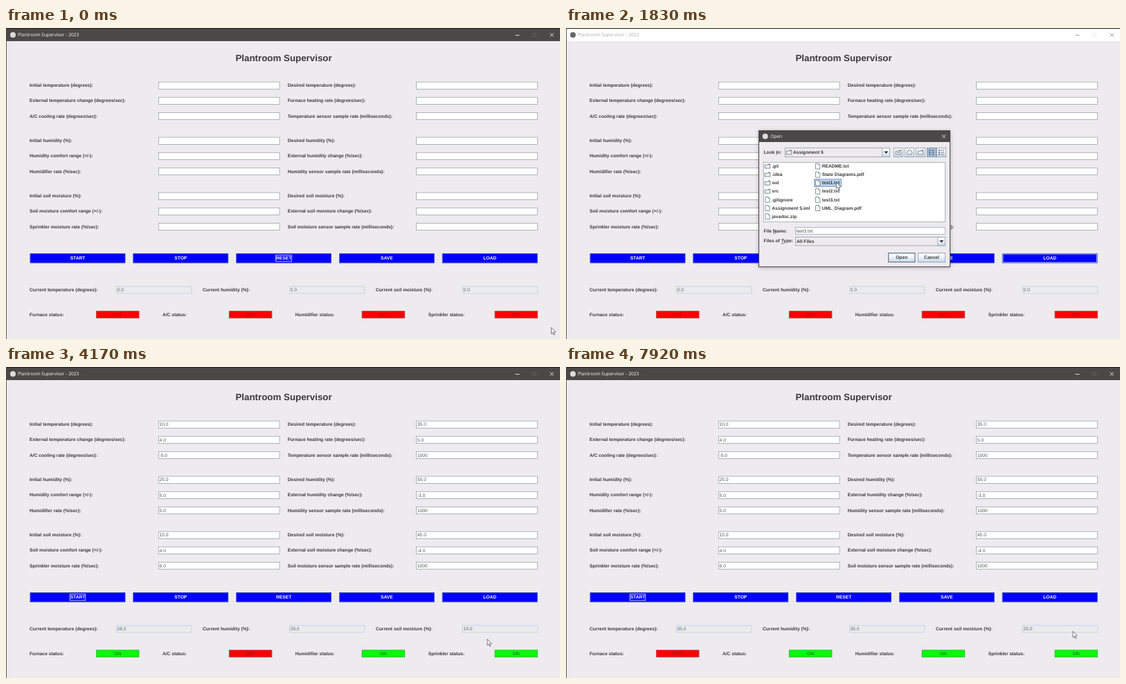
These frames come from a looping animation (800x450 px, 8000 ms). An HTML page with a canvas:

```html
<!DOCTYPE html>
<html lang="en">
<head>
<meta charset="utf-8">
<title>Plantroom Supervisor</title>
<style>
html, body { margin: 0; width: 100%; height: 100%; overflow: hidden; background: #edebed; }
canvas { display: block; width: 100vw; height: 100vh; }
</style>
</head>
<body>
<canvas id="stage" width="800" height="450"></canvas>
<script>
const ctx = document.getElementById('stage').getContext('2d');
const LOOP = 8000, STEP = 1000 / 12;
const APP = 'Plantroom Supervisor';
const SANS = '"Liberation Sans", Arial, sans-serif';
const BOLD = 'bold 6.67px ' + SANS, PLAIN = '6.67px ' + SANS;
const BAR = '6.67px "Open Sans", sans-serif';
const BG = '#edebed', INK = '#3a3a3a', EDGE = '#7a8490', SKY = '#b8cfe5';
const HAIR = 0.6;

// Moments of the interaction, in ms
const PRESS_LOAD = 830, BLUR = 910, OPEN = 1080, PICK = 1745, CLOSE = 2080,
  PRESS_START = 2825, RELEASE_START = 2910, FIRST_SAMPLE = 2995;

// Cursor tip: time, x, y
const PATH = [
  [0, 787, 433], [150, 784, 426], [580, 702, 338], [700, 694, 331], [880, 690, 330],
  [1000, 616, 318], [1250, 470, 262], [1580, 392, 224], [1700, 390, 223], [1990, 390, 223],
  [2200, 322, 276], [2417, 226, 323], [2500, 160, 328], [2667, 108, 329], [2920, 108, 329],
  [3170, 190, 338], [3417, 333, 350], [3667, 480, 372], [4000, 648, 400], [4200, 704, 392],
  [4417, 718, 384], [7500, 718, 384], [7830, 731, 382], [8000, 732, 382]
];

const ROWS = [
  ['Initial temperature (degrees):', '10.0', 'Desired temperature (degrees):', '35.0'],
  ['External temperature change (degrees/sec):', '4.0', 'Furnace heating rate (degrees/sec):', '5.0'],
  ['A/C cooling rate (degrees/sec):', '-5.0', 'Temperature sensor sample rate (milliseconds):', '1000'],
  ['Initial humidity (%):', '25.0', 'Desired humidity (%):', '55.0'],
  ['Humidity comfort range (+/-):', '5.0', 'External humidity change (%/sec):', '-3.0'],
  ['Humidifier rate (%/sec):', '5.0', 'Humidity sensor sample rate (milliseconds):', '1000'],
  ['Initial soil moisture (%):', '15.0', 'Desired soil moisture (%):', '45.0'],
  ['Soil moisture comfort range (+/-):', '4.0', 'External soil moisture change (%/sec):', '-4.0'],
  ['Sprinkler moisture rate (%/sec):', '6.0', 'Soil moisture sensor sample rate (milliseconds):', '1000']
];
const BUTTONS = ['START', 'STOP', 'RESET', 'SAVE', 'LOAD'];
const FOLDERS = ['.git', '.idea', 'out', 'src'];
const FILES = [
  [...FOLDERS, '.gitignore', 'Assignment 5.iml', 'javadoc.zip'],
  ['README.txt', 'State Diagrams.pdf', 'test1.txt', 'test2.txt', 'test3.txt', 'UML_Diagram.pdf']
];

function text(s, x, y, font = BOLD, color = INK, align = 'left') {
  ctx.font = font;
  ctx.fillStyle = color;
  ctx.textAlign = align;
  ctx.fillText(s, x, y);
}

function box(x, y, w, h, fill, edge, lw = HAIR) {
  if (fill) { ctx.fillStyle = fill; ctx.fillRect(x, y, w, h); }
  if (edge) {
    ctx.strokeStyle = edge;
    ctx.lineWidth = lw;
    ctx.strokeRect(x + lw / 2, y + lw / 2, w - lw, h - lw);
  }
}

function trace(pts) {
  ctx.beginPath();
  pts.forEach(([x, y], i) => i ? ctx.lineTo(x, y) : ctx.moveTo(x, y));
}

function line(color, lw, ...pts) {
  trace(pts);
  ctx.strokeStyle = color;
  ctx.lineWidth = lw;
  ctx.stroke();
}

function shape(fill, edge, lw, pts) {
  trace(pts);
  ctx.closePath();
  ctx.fillStyle = fill;
  ctx.fill();
  if (edge) { ctx.strokeStyle = edge; ctx.lineWidth = lw; ctx.stroke(); }
}

function dot(x, y, r, color) {
  ctx.fillStyle = color;
  ctx.beginPath();
  ctx.arc(x, y, r, 0, Math.PI * 2);
  ctx.fill();
}

function cross(x, y, color) {
  line(color, 0.9, [x - 2.6, y - 2.6], [x + 2.6, y + 2.6]);
  line(color, 0.9, [x - 2.6, y + 2.6], [x + 2.6, y - 2.6]);
}

// Label with one underlined letter
function mnemonic(s, at, x, y) {
  text(s, x, y);
  const a = x + ctx.measureText(s.slice(0, at)).width;
  line(INK, 0.6, [a, y + 3.2], [a + ctx.measureText(s[at]).width, y + 3.2]);
}

function shade(y, h) {
  const g = ctx.createLinearGradient(0, y, 0, y + h);
  g.addColorStop(0, '#e4ecf4');
  g.addColorStop(0.3, '#fafbfd');
  g.addColorStop(1, '#c4d6e8');
  return g;
}

function titleBar(active) {
  const ink = active ? '#fff' : '#aaa';
  box(0, 0, 800, 19, active ? '#4b4848' : '#fff');
  box(0, 0, 800, 1, '#1b1a1b');
  dot(10, 10, 4, active ? '#dcdcdc' : '#666');
  text(APP + ' - 2023', 17, 10.2, BAR, ink);
  line(active ? '#eee' : '#999', 0.9, [735.5, 10.5], [741.5, 10.5]);
  box(760.5, 7.5, 5, 5, null, active ? '#6c6969' : '#e2e2e2', 0.8);
  cross(788.3, 10, active ? '#eee' : '#888');
}

function button(label, i, focused, pressed, hover) {
  const x = 34.7 + i * 148.8, w = 137.6, y = 326;
  box(x, y, w, 14.2, pressed ? '#adc4db' : '#00f', EDGE);
  if (hover) box(x + HAIR, y + HAIR, w - 2 * HAIR, 13, null, SKY, 0.9);
  text(label, x + w / 2, y + 7.4, BOLD, pressed ? '#d9e4ef' : '#fff', 'center');
  if (focused) {
    const tw = ctx.measureText(label).width;
    box(x + w / 2 - tw / 2 - 0.8, y + 2.1, tw + 1.6, 10.1, null, '#dfe8fa', 0.8);
  }
}

function form(loaded) {
  ROWS.forEach((row, i) => {
    const y = 83.2 + Math.floor(i / 3) * 80 + (i % 3) * 22.1;
    [[34, 220], [406.7, 592.3]].forEach(([lx, fx], c) => {
      text(row[c * 2], lx, y + 0.3);
      box(fx, y - 5.4, 175.3, 10.8, '#fff', EDGE);
      if (loaded) text(row[c * 2 + 1], fx + 1.6, y + 0.4, PLAIN, '#555');
    });
  });
}

// Readings and switches after n samples
function greenhouse(n) {
  if (!n) return { values: [0, 0, 0], on: [0, 0, 0, 0] };
  const temp = [19, 28, 32, 36, 35][n - 1];
  return {
    values: [temp, 25 + 2 * n, 15 + 2 * n],
    on: [n < 3, n > 4, true, true]
  };
}

function readings(n) {
  const { values, on } = greenhouse(n);
  ['temperature (degrees)', 'humidity (%)', 'soil moisture (%)'].forEach((s, i) => {
    const x = 34 + i * 250;
    text('Current ' + s + ':', x, 379.3);
    box(x + 125, 373.6, 109.3, 10.8, '#ebebed', SKY, 0.8);
    text(values[i].toFixed(1), x + 126.6, 379.4, PLAIN, '#666');
  });
  ['Furnace', 'A/C', 'Humidifier', 'Sprinkler'].forEach((s, i) => {
    const x = 34 + i * 191.9;
    text(s + ' status:', x, 415.1);
    box(x + 96, 409.4, 62.3, 10.7, on[i] ? '#0f0' : '#f00', EDGE);
    text(on[i] ? 'ON' : 'OFF', x + 127.2, 415.2, PLAIN,
      on[i] ? 'rgba(35,50,35,.8)' : 'rgba(60,40,40,.6)', 'center');
  });
}

function folder(x, y) {
  shape('#e9eef4', '#5d656e', 0.7,
    [[x - 3.8, y - 2], [x, y - 2], [x + 1, y - 3], [x + 3.8, y - 3], [x + 3.8, y + 3], [x - 3.8, y + 3]]);
  line('#5d656e', 0.9, [x + 0.8, y - 2.4], [x + 3.6, y - 2.4]);
}

function sheet(x, y) {
  shape('#fff', '#59636e', 0.7,
    [[x - 3, y - 4], [x + 1, y - 4], [x + 3.2, y - 1.8], [x + 3.2, y + 4], [x - 3, y + 4]]);
  line('#59636e', 0.5, [x + 1, y - 4], [x + 1, y - 1.8], [x + 3.2, y - 1.8]);
}

function combo(x, y, w, h) {
  const arrow = 11.5, cx = x + w - arrow / 2, cy = y + h / 2;
  box(x, y, w, h, BG, EDGE);
  box(x + w - arrow, y, arrow, h, shade(y, h), EDGE);
  shape('#222', null, 0, [[cx - 3, cy - 1.4], [cx + 3, cy - 1.4], [cx, cy + 1.8]]);
}

function toolbar() {
  [473, 489, 505, 521, 535].forEach((x, i) => {
    const chosen = i === 3, cx = x + 7, cy = 180;
    box(x, 173, 14, 14, chosen ? '#a3bdd7' : shade(173, 14), EDGE);
    if (i < 3) {
      if (i === 1) shape('#e9eef4', '#5d656e', 0.7, [[cx - 4, cy], [cx - 2, cy - 3], [cx + 2, cy - 3], [cx + 4, cy], [cx + 3, cy + 3], [cx - 3, cy + 3]]);
      else folder(cx, cy);
      if (i === 0) line('#333', 0.7, [cx - 1.5, cy + 1], [cx, cy - 0.8], [cx + 1.5, cy + 1]);
    } else {
      for (let r = -1; r < 2; r++) {
        const y = cy + r * 3;
        box(cx - 4, y - 0.9, 1.8, 1.8, '#4d617c');
        line('#555', 0.7, [cx - 1.2, y], [cx + (chosen ? 0.2 : 4), y]);
        if (chosen) box(cx + 1.4, y - 0.9, 1.8, 1.8, '#4d617c');
      }
    }
  });
}

function dialog(picked) {
  ctx.save();
  ctx.shadowColor = 'rgba(0,0,0,.3)';
  ctx.shadowBlur = 5;
  ctx.shadowOffsetY = 1;
  box(278, 148, 277, 198, BG);
  ctx.restore();
  box(278, 148, 277, 198, null, '#4b4848', 1);
  box(278, 148, 277, 17, '#4b4848');
  dot(287.7, 156.8, 4, '#dcdcdc');
  text('Open', 295, 157, BAR, '#fff');
  cross(545.7, 156.8, '#eee');

  mnemonic('Look In:', 5, 285.5, 180);
  combo(316, 173, 152, 14);
  folder(322, 180);
  text('Assignment 5', 328, 180);
  toolbar();

  box(285, 194, 263, 87, '#fff', EDGE);
  FILES.forEach((names, c) => names.forEach((name, r) => {
    const x = 291 + c * 72.5, y = 200 + r * 12.1;
    if (picked && name === 'test1.txt') box(x - 5.4, y - 5.7, 40, 11.4, SKY, '#6382bf');
    (FOLDERS.includes(name) ? folder : sheet)(x, y);
    text(name, x + 6.2, y + 0.3);
  }));

  mnemonic('File Name:', 5, 285.5, 293.8);
  box(331, 288, 217, 11, '#fff', EDGE);
  if (picked) text('test1.txt', 332.8, 293.8, PLAIN, '#444');
  mnemonic('Files of Type:', 9, 285.5, 308.6);
  combo(331, 302, 217, 13.2);
  text('All Files', 333, 308.8);

  box(465, 325, 39.5, 14.2, shade(325, 14), '#66788a', 1.2);
  text('Open', 484.7, 332.3, BOLD, INK, 'center');
  box(508, 325, 40, 14.2, shade(325, 14), EDGE);
  text('Cancel', 528, 332.3, BOLD, INK, 'center');
}

function cursor(t) {
  let i = 1;
  while (i < PATH.length - 1 && PATH[i][0] < t) i++;
  const [t0, x0, y0] = PATH[i - 1], [t1, x1, y1] = PATH[i];
  const p = Math.min(1, (t - t0) / (t1 - t0));
  const x = x0 + (x1 - x0) * p, y = y0 + (y1 - y0) * p;
  shape('#fff', '#444', 0.7, [[0, 0], [0, 9], [2, 7.2], [3.5, 10.6], [4.9, 10], [3.5, 6.7], [6.3, 6.5]]
    .map(([a, b]) => [x + 0.4 + a, y + 0.4 + b]));
}

function draw(t) {
  const within = (a, b) => t >= a && t < b;
  const focus = t < PRESS_LOAD ? 'RESET' : within(CLOSE, PRESS_START) ? 'LOAD' : t >= PRESS_START ? 'START' : '';
  const pressed = within(PRESS_LOAD, OPEN) ? 'LOAD' : within(PRESS_START, RELEASE_START) ? 'START' : '';
  const samples = Math.max(0, Math.min(5, Math.floor((t - FIRST_SAMPLE) / 1000) + 1));

  ctx.textBaseline = 'middle';
  ctx.textRendering = 'geometricPrecision';
  box(0, 0, 800, 450, BG);
  titleBar(!within(BLUR, CLOSE));
  box(0, 0, 0.9, 450, '#4a4849');
  text(APP, 401, 44.6, 'bold 13.33px ' + SANS, INK, 'center');
  form(t >= CLOSE);
  BUTTONS.forEach((b, i) =>
    button(b, i, b === focus && b !== pressed, b === pressed, b === 'LOAD' && within(OPEN, CLOSE)));
  readings(samples);
  if (within(OPEN, CLOSE)) dialog(t >= PICK);
  cursor(t);
}

function tick(now) {
  const elapsed = Math.max(0, now - begin) % LOOP;
  draw(Math.floor((elapsed + 5) / STEP) % 96 * STEP);
  requestAnimationFrame(tick);
}
const begin = performance.now();
draw(0);
requestAnimationFrame(tick);
</script>
</body>
</html>
```
